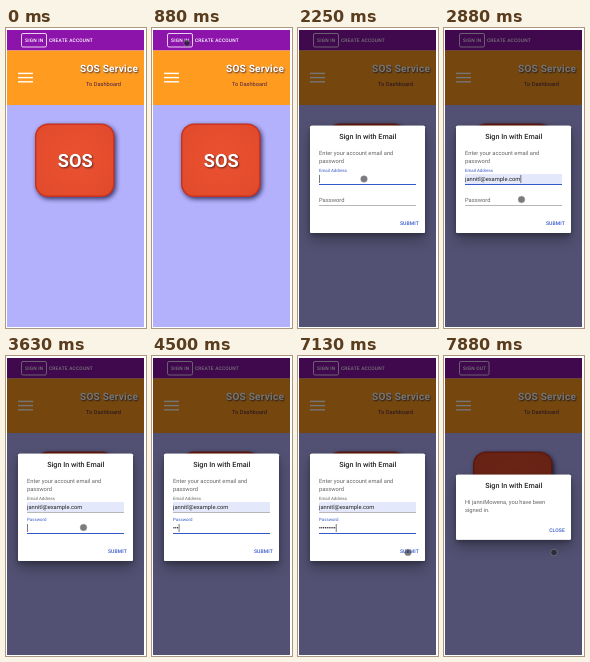
Recreate the animation shown at these times as an HTML page with a canvas. Size 140 by 300 pixels, loop 8000 ms.

```html
<!DOCTYPE html>
<html lang="en">
<head>
<meta charset="utf-8">
<title>SOS sign in</title>
<style>
html, body { margin: 0; width: 100%; height: 100%; overflow: hidden; background: #fff; }
canvas { display: block; width: 140px; height: 300px; }
</style>
</head>
<body>
<canvas id="stage"></canvas>
<script>
const LOOP = 8000, STEP = 125;
const BLUE = '#3558c8', INK = '#222', GREY = '#666';
const EMAIL = 'jannitl@example.com', USER = 'janniMowena';
const OPEN = 1250, FILLED = 2625, PASSWORD = 3125, TYPING = 3875, RESUME = 4500, MOVE = 6250, DONE = 7375;
const BODY = 5.75, SMALL = 4.4, DOT_GAP = 1.85;

const canvas = document.getElementById('stage');
const ratio = window.devicePixelRatio || 1;
canvas.width = 140 * ratio;
canvas.height = 300 * ratio;
const c = canvas.getContext('2d');
c.textRendering = 'geometricPrecision';

const clamp = v => Math.max(0, Math.min(1, v));
const ease = v => v * v * (3 - 2 * v);

function rect(x, y, w, h, color) {
  c.fillStyle = color;
  c.fillRect(x, y, w, h);
}

function rounded(x, y, w, h, r) {
  c.beginPath();
  c.roundRect(x, y, w, h, r);
}

function text(s, x, y, size, color, { weight = 400, align = 'left', space = 0 } = {}) {
  c.font = `${weight} ${size}px Roboto, sans-serif`;
  c.textAlign = align;
  c.letterSpacing = space + 'px';
  c.fillStyle = color;
  c.fillText(s, x, y);
}

function shadow(color, blur, x, y) {
  c.shadowColor = color;
  c.shadowBlur = blur * ratio;
  c.shadowOffsetX = x * ratio;
  c.shadowOffsetY = y * ratio;
}

function page(signedIn) {
  rect(0, 0, 140, 300, '#fff');
  rect(1, 2, 137, 20.5, '#8c14ab');
  rect(1, 22.5, 137, 54.5, '#ff9c20');
  rect(1, 77, 137, 222, '#b3b1fc');

  c.strokeStyle = '#f4e6f8';
  c.lineWidth = 0.9;
  rounded(15.5, 5.5, signedIn ? 29.5 : 25, 13.5, 1.5);
  c.stroke();
  const caps = { weight: 500, space: 0.2 };
  text(signedIn ? 'SIGN OUT' : 'SIGN IN', 19, 14.3, 4.85, '#fff', caps);
  if (!signedIn) text('CREATE ACCOUNT', 43, 14.3, 4.85, '#fff', caps);

  for (let i = 0; i < 3; i++) rect(12, 44.7 + i * 4.2, 15, 1.4, '#fff');

  c.save();
  shadow('rgba(40,30,60,.85)', 1.6, 0.8, 0.8);
  text('SOS Service', 74, 44, 10.1, '#fff', { weight: 700, space: 0.2 });
  c.restore();
  text('To Dashboard', 97.5, 57.7, 5.65, '#4b2145', { align: 'center' });

  c.save();
  shadow('rgba(25,25,75,.85)', 5, 1.5, 2);
  rounded(29, 95.5, 79.5, 73.5, 13);
  c.fillStyle = '#c9321f';
  c.fill();
  c.restore();
  const glow = c.createRadialGradient(69, 132, 10, 69, 132, 52);
  glow.addColorStop(0, '#e9502f');
  glow.addColorStop(1, '#e04a2b');
  rounded(30.5, 97, 76.5, 70.5, 11.5);
  c.fillStyle = glow;
  c.fill();
  c.save();
  shadow('rgba(60,20,20,.8)', 2, 0.8, 1);
  text('SOS', 69.3, 138.6, 18.2, '#fff', { weight: 700, align: 'center' });
  c.restore();
}

function panel(y, h) {
  c.save();
  c.fillStyle = '#fff';
  rounded(12, y, 115, h, 1.5);
  shadow('rgba(0,0,0,.3)', 14, 0, 7);
  c.fill();
  shadow('rgba(0,0,0,.25)', 4, 0, 2);
  c.fill();
  c.restore();
  text('Sign In with Email', 69.7, y + 13.3, 7.2, INK, { weight: 500, align: 'center' });
}

function button(label, y) {
  text(label, 121, y, 5, BLUE, { weight: 500, align: 'right', space: 0.15 });
}

function field(label, raised, base, focused) {
  text(label, 21, raised ? base - 9.2 : base, raised ? SMALL : BODY, focused ? BLUE : GREY);
  rect(21, base + 3, 97, focused ? 1 : 0.6, focused ? BLUE : '#888');
}

function caret(x, base) {
  rect(x, base - 6, 0.6, 8, INK);
}

function dotCount(t) {
  if (t < TYPING) return 0;
  if (t < RESUME) return Math.min(3, 1 + Math.floor((t - TYPING) / 150));
  return Math.min(9, 3 + Math.floor((t - RESUME) / 220));
}

function signIn(t) {
  const filled = t >= FILLED;
  const onEmail = t >= 2250 && t < PASSWORD;
  const dots = dotCount(t);

  panel(97.7, 107.3);
  text('Enter your account email and', 21, 127, BODY, GREY);
  text('password', 21, 135, BODY, GREY);

  if (filled) rect(21, 146, 97, 10, '#e3e9fa');
  field('Email Address', filled || onEmail, 153, onEmail);
  if (filled) text(EMAIL, 21, 153, BODY, INK);
  if (onEmail) caret(filled ? 21.3 + c.measureText(EMAIL).width : 21.2, 153);

  field('Password', dots > 0 || !onEmail, 174, !onEmail);
  c.fillStyle = INK;
  for (let i = 0; i < dots; i++) {
    c.beginPath();
    c.arc(21.9 + i * DOT_GAP, 171.8, 0.68, 0, 7);
    c.fill();
  }
  if (!onEmail) caret(21.2 + dots * DOT_GAP, 174);
  button('SUBMIT', 197);
}

function welcome() {
  panel(118.7, 65);
  text(`Hi ${USER}, you have been`, 21, 147.5, BODY, GREY);
  text('signed in.', 21, 155.5, BODY, GREY);
  button('CLOSE', 176);
}

// Each leg: start, end, from x/y, to x/y
const legs = [
  [125, 875, 141, 296, 35, 15],
  [1000, 1375, 35, 15, 32.5, 15],
  [1750, 2250, 32.5, 15, 66, 151],
  [2375, 2750, 66, 151, 77.5, 171.5],
  [MOVE, 7000, 77.5, 171.5, 110, 196.5]
];

function pointer(t) {
  const leg = legs.findLast(l => t >= l[0]);
  if (!leg || (t >= TYPING && t < MOVE)) return;
  const [a, b, x0, y0, x1, y1] = leg;
  const k = ease(clamp((t - a) / (b - a)));
  const press = t >= 1125 && t < 1750;
  c.beginPath();
  c.arc(x0 + (x1 - x0) * k, y0 + (y1 - y0) * k, press ? 4 : 3.3, 0, 7);
  c.fillStyle = press ? 'rgba(45,35,50,.35)' : 'rgba(20,20,25,.56)';
  c.fill();
  c.strokeStyle = press ? 'rgba(230,215,235,.9)' : 'rgba(150,150,160,.6)';
  c.lineWidth = 0.8;
  c.stroke();
}

function draw(time) {
  const t = Math.floor((time % LOOP) / STEP) * STEP;
  const done = t >= DONE;
  c.setTransform(ratio, 0, 0, ratio, 0, 0);
  page(done);
  if (t >= OPEN) {
    rect(1, 2, 137, 297, 'rgba(0,0,0,.54)');
    if (done) welcome();
    else signIn(t);
  }
  pointer(t);
}

function loop() {
  draw(performance.now());
  requestAnimationFrame(loop);
}
loop();
</script>
</body>
</html>
```
